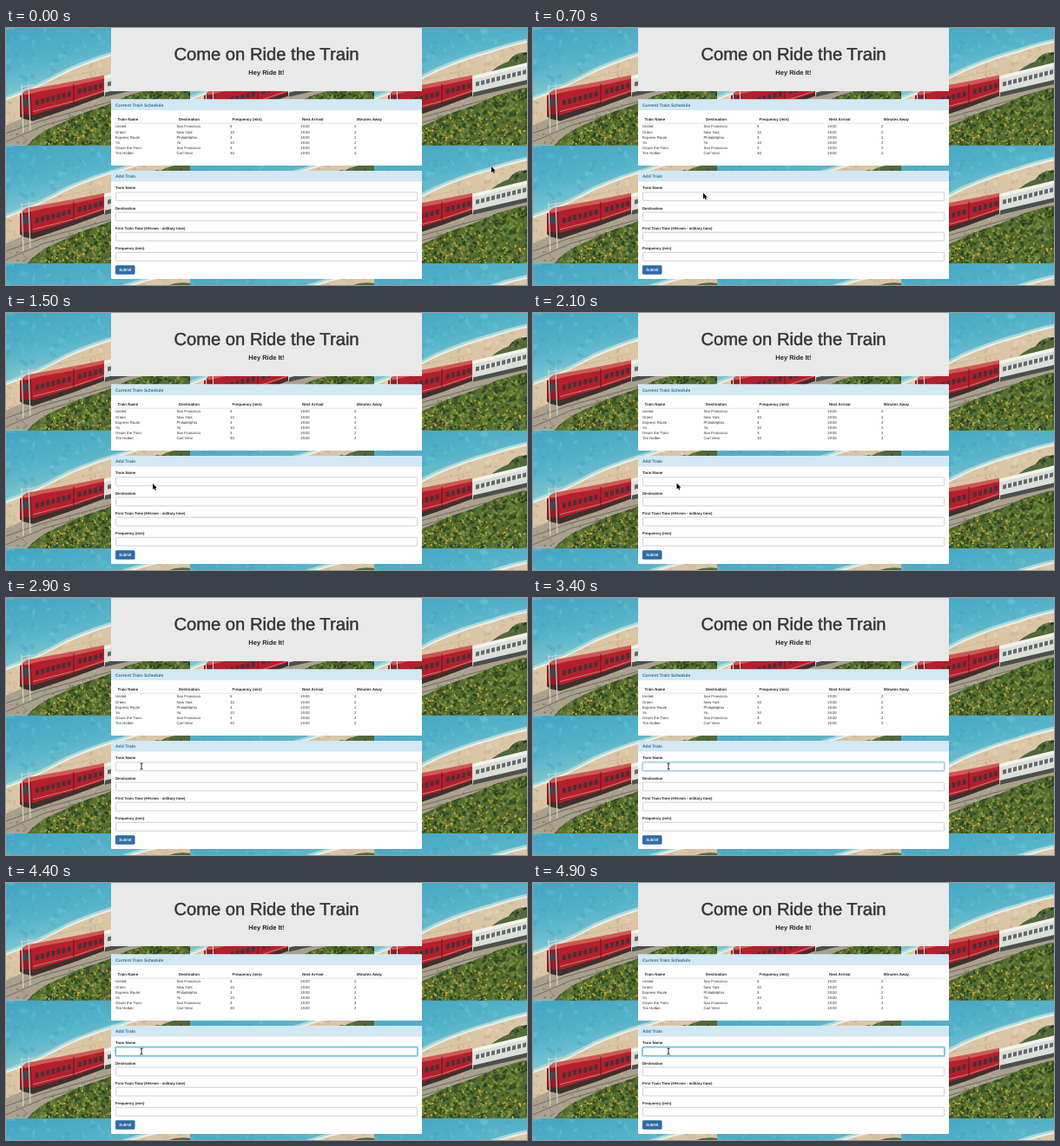
Animation, 600 px wide and 297 px high, one loop 5 s. Source, as an HTML page with a canvas:

```html
<!DOCTYPE html>
<html lang="en">
<head>
<meta charset="utf-8">
<title>Train schedule</title>
<style>
  html, body { margin: 0; width: 100%; height: 100%; overflow: hidden; background: #4aa9c2; }
  canvas, svg { position: absolute; left: 0; top: 0; width: 600px; height: 297px; }
  text { font-family: "Liberation Sans", Arial, sans-serif; font-size: 4.3px; fill: #333; text-rendering: geometricPrecision; }
  .b { font-weight: bold; fill: #222; }
  .head { font-size: 5.02px; font-weight: bold; fill: #31708f; }
  .th { font-size: 4.4px; }
  .field { fill: #fff; stroke: #c4c4c4; stroke-width: .8; }
</style>
</head>
<body>
<canvas id="scene" width="600" height="297"></canvas>
<svg id="ui" viewBox="0 0 600 297">
  <rect x="121" width="358" height="73" fill="#e9e9e9"/>
  <text x="300" y="37.3" text-anchor="middle" style="font-size:20.2px;stroke:#333;stroke-width:.45">Come on Ride the Train</text>
  <text x="300" y="54" text-anchor="middle" class="b" style="font-size:7.5px">Hey Ride It!</text>

  <rect x="121" y="82.5" width="358" height="76.5" rx="1" fill="#fefefe"/>
  <rect x="121" y="82.5" width="358" height="12.5" fill="#d2e8f4"/>
  <text x="126" y="90.6" class="head">Current Train Schedule</text>
  <path d="M126 110.2H474" stroke="#ddd" stroke-width=".8"/>
  <g id="table"></g>

  <rect x="121" y="165" width="358" height="125" rx="1" fill="#fefefe"/>
  <rect x="121" y="165" width="358" height="12.5" fill="#d2e8f4"/>
  <text x="126" y="173" class="head">Add Train</text>
  <g id="form"></g>
  <g id="focus" opacity="0" fill="none">
    <rect x="125.6" y="189.1" width="348.8" height="11.3" rx="1.8" stroke="#a9dcf3" stroke-width="1.8"/>
    <rect x="126.4" y="189.9" width="347.2" height="9.8" rx="1.2" stroke="#58b3e3" stroke-width=".9"/>
  </g>
  <rect x="126.2" y="274.6" width="22" height="9.9" rx="1.2" fill="#2b6da9" stroke="#245a8c" stroke-width=".5"/>
  <text x="130.2" y="281.1" style="font-size:4.5px;fill:#fff;stroke:#fff;stroke-width:.1">Submit</text>

  <path id="arrow" d="M0 0V7L1.6 5.6L2.7 8L3.8 7.5L2.8 5.2H4.9Z" fill="#000" stroke="#fff" stroke-width=".6" paint-order="stroke"/>
  <g id="beam" fill="none">
    <path d="M-1.6-3.6Q0-3.6 0-2.5Q0-3.6 1.6-3.6M0-2.7V2.7M-1.6 3.6Q0 3.6 0 2.5Q0 3.6 1.6 3.6" stroke="#111" stroke-width=".9"/>
  </g>
</svg>
<script>
const $ = id => document.getElementById(id);

function label(parent, x, y, str, cls = '') {
  const t = document.createElementNS('http://www.w3.org/2000/svg', 'text');
  t.setAttribute('x', x);
  t.setAttribute('y', y);
  t.setAttribute('class', cls);
  t.textContent = str;
  $(parent).append(t);
}

const heads = [['Train Name', 128.5], ['Destination', 199], ['Frequency (min)', 260.5], ['Next Arrival', 341], ['Minutes Away', 404]];
const cols = [126, 196.5, 258, 339, 401];
const trains = [
  ['United', 'San Francisco', 5], ['Orient', 'New York', 10],
  ['Express Route', 'Philadelphia', 3], ['Yo', 'Yo', 10],
  ['Oswin the Train', 'San Francisco', 3], ['Tim Holber', 'Carl Venn', 30]
];
heads.forEach(([str, x]) => label('table', x, 106.5, str, 'b th'));
trains.forEach((row, r) => [...row, '19:00', 2].forEach((str, c) =>
  label('table', cols[c], 115.4 + r * 6.13, str)));

['Train Name', 'Destination', 'First Train Time (HH:mm - military time)', 'Frequency (min)'].forEach((str, i) => {
  const y = 186.4 + i * 23.15;
  label('form', 126, y, str, 'b');
  const box = document.createElementNS('http://www.w3.org/2000/svg', 'rect');
  Object.entries({ x: 126.4, y: y + 3.5, width: 347.2, height: 9.8, rx: 1.2, class: 'field' })
    .forEach(([k, v]) => box.setAttribute(k, v));
  $('form').append(box);
});

// Seaside railway, repeated as a tile
const W = 212, H = 136.3;
const g = $('scene').getContext('2d');
let seed;
const rnd = () => (seed = (seed * 16807) % 2147483647) / 2147483647;

function shape(d, fill) {
  g.fillStyle = fill;
  g.fill(new Path2D(d));
}
function line(d, color, width) {
  g.strokeStyle = color;
  g.lineWidth = width;
  g.stroke(new Path2D(d));
}
function specks(d, colors, count, size, top = 0) {
  g.save();
  g.clip(new Path2D(d));
  for (let i = 0; i < count; i++) {
    g.fillStyle = colors[Math.floor(rnd() * colors.length)];
    g.beginPath();
    g.ellipse(rnd() * W, top + rnd() * (H - top), size * (.5 + rnd()), size * (.4 + rnd() * .6), rnd() * 3, 0, 7);
    g.fill();
  }
  g.restore();
}

function tile() {
  seed = 77;
  const sea = g.createLinearGradient(0, 0, 20, 85);
  sea.addColorStop(0, '#43a5c3');
  sea.addColorStop(.55, '#55b3c9');
  sea.addColorStop(1, '#8accd2');
  g.fillStyle = sea;
  g.fillRect(0, 0, W, H);
  specks('M0 0H212V12L135 26L70 48L0 78Z', ['#3c9dba55', '#69bdd055', '#82cad655'], 260, 3);

  const shore = 'M0 83Q36 70 70 51Q104 36 135 28Q166 17 212 10';
  const sand = shore + 'V136H0Z';
  line(shore, '#a8dadb', 7);
  shape(sand, '#dac5a5');
  specks(sand, ['#e7d8bd88', '#c5ab8688', '#d0b79488'], 420, 2.2);
  line(shore, '#f0eee4', 2);

  const trees = 'M128 57Q142 43 155 39Q162 27 178 29Q195 20 212 23V82H126Z';
  shape(trees, '#52683b');
  specks(trees, ['#344d27', '#617a3d', '#7c8949', '#263e20'], 650, 2);

  shape('M0 113L28 101L62 92L128 73L212 56V90L110 106L52 121L30 136H0Z', '#aaa08e');
  specks('M0 115L35 101L120 78V101L50 121L30 136H0Z', ['#8d8576', '#c6bba5', '#747064'], 500, 1.1);
  line('M0 122L40 108L130 83M0 132L44 113L135 87', '#655e55', .8);

  const bush = 'M24 137Q37 121 60 112L83 101L115 90L140 79L170 70L212 66V137Z';
  shape(bush, '#566d30');
  specks(bush, ['#344e24', '#68823a', '#80913f', '#29431f', '#496427'], 1600, 2, 60);
  specks('M38 137L59 116L91 102L134 96L159 113L200 107L212 137Z', ['#dfaa2d', '#c69929', '#e4bd48'], 240, 1.1, 85);

  // carriages
  shape('M113 58L145 50L178 42V63L145 71L113 78Z', '#dcdeda');
  shape('M113 56L145 48L178 40V44L145 52L113 60Z', '#f3f2ec');
  shape('M114 75L178 60V65L114 80Z', '#4c504c');
  shape('M16 79L22 74L43 70L78 64L113 57V77L78 89L43 99L30 104L16 103Z', '#b51f2b');
  shape('M18 76L24 72L78 62L113 55V59L78 67L43 73L22 78Z', '#cf5853');
  shape('M16 79L29 77L31 104L16 103Z', '#911c28');
  shape('M18 82L27 81L28 90L18 91Z', '#41454b');
  shape('M17 100L31 101L78 87L113 75V79L78 92L31 108L18 105Z', '#3c302e');
  line('M31 97L78 85L113 73', '#d9a59a', .7);
  line('M78 65V88', '#5d1820', 1);
  for (let i = 0; i < 13; i++) {
    if (i === 7) continue;
    const x = 34 + i * 6.1;
    shape(`M${x} ${84 - i * 1.6}l4-1v6l-4 1Z`, '#4a3035');
  }
  for (let i = 0; i < 10; i++) {
    const x = 117 + i * 6;
    shape(`M${x} ${63 - i * 1.5}l4-1v5l-4 1Z`, '#626a6b');
  }

  // masts
  line('M18 66L20 122M26 65L28 119M17 69L33 66', '#d8d8ce', 1.1);
  line('M18 70L114 47', '#716f6855', .4);
}

for (let y = 0; y < 3; y++) for (let x = 0; x < 3; x++) {
  g.save();
  g.translate(x * W, y * H - .5);
  g.beginPath();
  g.rect(0, 0, W, H);
  g.clip();
  tile();
  g.restore();
}

// time, x, y of the pointer
const path = [
  [0, 559, 160], [100, 548, 161], [200, 500, 166], [300, 420, 173],
  [400, 330, 181], [500, 258, 187], [600, 214, 190], [700, 196, 190.5],
  [1000, 180, 194], [1500, 169, 197], [2100, 165.5, 196.5],
  [2500, 160, 195.5], [2800, 156, 194.5], [5000, 156, 194.5]
];
const LOOP = 5000, STEP = 100, BEAM_AT = 2600, FOCUS_AT = 3400;

function draw(now) {
  const t = Math.floor((now % LOOP) / STEP) * STEP;
  const i = path.findIndex(p => p[0] > t);
  const [t0, x0, y0] = path[i - 1], [t1, x1, y1] = path[i];
  const k = (t - t0) / (t1 - t0);
  const move = `translate(${x0 + (x1 - x0) * k} ${y0 + (y1 - y0) * k})`;
  $('arrow').setAttribute('transform', move);
  $('beam').setAttribute('transform', move);
  $('arrow').setAttribute('opacity', t < BEAM_AT ? 1 : 0);
  $('beam').setAttribute('opacity', t < BEAM_AT ? 0 : 1);
  $('focus').setAttribute('opacity', Math.max(0, Math.min(1, (t - FOCUS_AT + STEP) / 200)));
}

const start = performance.now();
function tick() {
  draw(performance.now() - start);
  requestAnimationFrame(tick);
}
tick();
</script>
</body>
</html>
```
